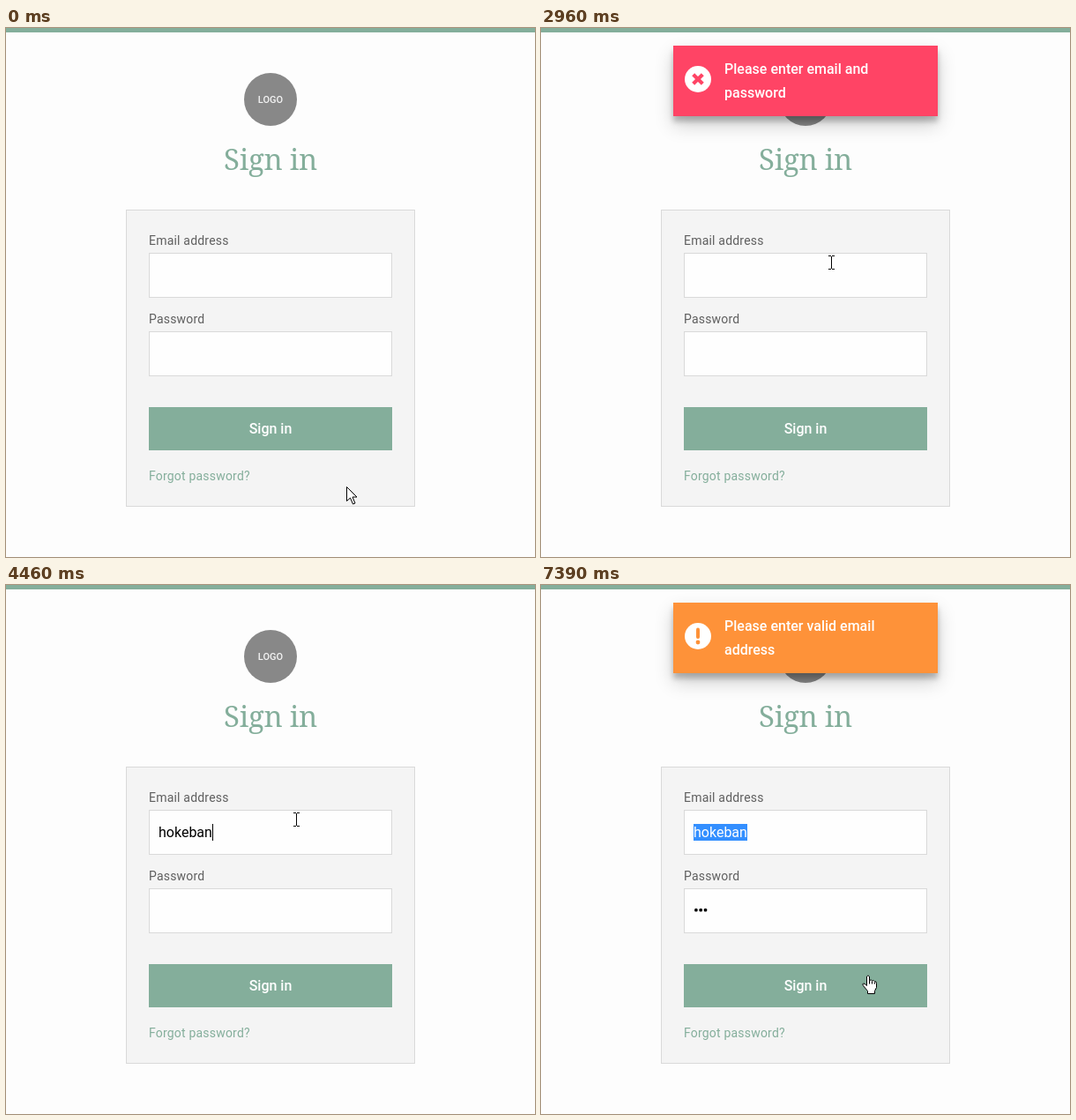
Write an HTML page with a canvas that moves like this. It is 600x600 px and loops after 8000 ms.

```html
<!DOCTYPE html>
<html lang="en">
<head>
<meta charset="utf-8">
<title>Sign in form</title>
<style>
html, body { margin: 0; width: 100%; height: 100%; overflow: hidden; background: #fdfdfd; }
canvas { display: block; }
</style>
</head>
<body>
<canvas id="stage" width="600" height="600"></canvas>
<script>
const ctx = document.getElementById('stage').getContext('2d');
const LOOP = 8000;
const GREEN = '#84ae9b';
const SANS = 'Roboto, "Liberation Sans", sans-serif';
const SERIF = '"Noto Serif", "DejaVu Serif", serif';
const USER = 'hokeban';

// Step tracks: [start time, value...]
const cursors = [
  [0, 'arrow', 386, 520], [530, 'arrow', 384, 517], [660, 'arrow', 372, 507],
  [790, 'arrow', 350, 489], [920, 'hand', 324, 463], [1050, 'hand', 318, 453],
  [2140, 'hand', 317, 449], [2290, 'beam', 317, 366], [2420, 'beam', 318, 286],
  [2560, 'beam', 325, 262], [2680, 'beam', 326, 258], [6410, 'arrow', 342, 337],
  [6560, 'beam', 359, 375], [6690, 'hand', 362, 432], [6840, 'hand', 363, 439],
  [6980, 'hand', 364, 442]
];
const typed = [[0, 0], [3370, 2], [3650, 3], [3790, 4], [4050, 5], [4180, 6], [4460, 7]];
const dots = [[0, 0], [5420, 1], [5570, 2], [5840, 3]];
const carets = [
  [0, ''], [1350, 'email'], [1880, ''], [2420, 'email'], [2960, ''], [3370, 'email'],
  [4870, 'pass'], [5290, ''], [5420, 'pass'], [6410, ''], [6980, 'pass'], [7260, '']
];
// kind, horizontal shift, opacity
const toasts = [
  [0, ''], [1350, 'error', 0, 1], [4310, 'error', -197, 1], [4460, ''],
  [7260, 'warning', 0, 0.5], [7390, 'warning', 0, 1]
];
const SELECT_AT = 7260;

const at = (track, t) => track.filter(step => step[0] <= t).pop().slice(1);

function rect(x, y, w, h, fill) {
  ctx.fillStyle = fill;
  ctx.fillRect(x, y, w, h);
}

function box(x, y, w, h, fill) {
  rect(x, y, w, h, '#d9d9d9');
  rect(x + 1, y + 1, w - 2, h - 2, fill);
}

function disc(x, y, r, fill) {
  ctx.fillStyle = fill;
  ctx.beginPath();
  ctx.arc(x, y, r, 0, Math.PI * 2);
  ctx.fill();
}

function text(str, x, y, font, fill, { align = 'left', spacing = 0 } = {}) {
  ctx.font = font;
  ctx.textAlign = align;
  ctx.letterSpacing = spacing + 'px';
  ctx.fillStyle = fill;
  ctx.fillText(str, x, y);
}

function line(x1, y1, x2, y2, width, color) {
  ctx.lineWidth = width;
  ctx.strokeStyle = color;
  ctx.beginPath();
  ctx.moveTo(x1, y1);
  ctx.lineTo(x2, y2);
  ctx.stroke();
}

function drawPage() {
  rect(0, 0, 600, 600, '#fdfdfd');
  rect(0, 0, 600, 5, GREEN);
  disc(300, 81, 30, '#888');
  text('LOGO', 300, 85, '500 11px ' + SANS, '#f4f4f4', { align: 'center' });
  text('Sign in', 300, 161, '33px ' + SERIF, GREEN, { align: 'center', spacing: -0.3 });

  box(136, 206, 328, 337, '#f4f4f4');
  const label = '14px ' + SANS;
  text('Email address', 162, 246, label, '#5f5f5f', { spacing: 0.2 });
  text('Password', 162, 335, label, '#5f5f5f', { spacing: 0.2 });
  box(162, 255, 276, 51, '#fefefe');
  box(162, 344, 276, 51, '#fefefe');
  rect(162, 430, 276, 49, GREEN);
  text('Sign in', 300, 460, '500 16px ' + SANS, '#fff', { align: 'center' });
  text('Forgot password?', 162, 513, label, GREEN, { spacing: 0.2 });
}

function drawFields(t) {
  const font = '16px ' + SANS;
  const value = USER.slice(0, at(typed, t)[0]);
  const count = at(dots, t)[0];
  const [focus] = at(carets, t);
  const selected = t >= SELECT_AT;

  ctx.font = font;
  ctx.letterSpacing = '0px';
  const width = Math.round(ctx.measureText(value).width);
  if (selected) rect(173, 271, width, 19, '#338fff');
  text(value, 173, 286, font, selected ? '#fff' : '#000');

  for (let i = 0; i < count; i++) disc(175.9 + i * 5.3, 368.7, 1.9, '#000');

  if (focus === 'email') rect(173 + width, 271, 1, 19, '#000');
  if (focus === 'pass') rect(173 + Math.round(count * 5.35), 360, 1, 19, '#000');
}

function drawToast(t) {
  const [kind, shift, alpha] = at(toasts, t);
  if (!kind) return;
  const error = kind === 'error';
  const color = error ? '#ff4465' : '#fe9239';

  ctx.save();
  ctx.translate(shift, 0);
  ctx.globalAlpha = alpha;
  for (const [dy, blur, a] of [[10, 20, 0.19], [6, 6, 0.23]]) {
    ctx.shadowColor = `rgba(0,0,0,${a})`;
    ctx.shadowOffsetY = dy;
    ctx.shadowBlur = blur;
    rect(150, 20, 300, 80, color);
  }
  ctx.shadowColor = 'transparent';
  rect(150, 20, 300, 80, color);

  disc(178, 58, 15, '#fff');
  if (error) {
    line(172.7, 52.7, 183.3, 63.3, 4.2, color);
    line(183.3, 52.7, 172.7, 63.3, 4.2, color);
  } else {
    ctx.lineCap = 'round';
    line(178, 50.5, 178, 59, 4, color);
    disc(178, 65, 2.4, color);
  }
  const lines = error
    ? ['Please enter email and', 'password']
    : ['Please enter valid email', 'address'];
  lines.forEach((s, i) => text(s, 208, 52 + i * 27, '500 16px ' + SANS, '#fff'));
  ctx.restore();
}

const arrowPath = new Path2D('M0 0V16L4 12.5L7 19.5L9.5 18.5L6.5 11.5H11.5Z');
const handPath = new Path2D(
  'M5 1.5Q6.5-.8 8 1.5V6Q10 4.6 11 6.5Q13 5.2 14 7.3Q16 6.8 16 9V14L14 18V21H6V18' +
  'L1 12Q-.3 10 1 9.5Q2.5 9 5 12Z');

function drawCursor(t) {
  const [shape, x, y] = at(cursors, t);
  ctx.save();
  ctx.translate(x, y);
  if (shape === 'beam') {
    rect(0, 0, 3, 1, '#000');
    rect(4, 0, 3, 1, '#000');
    rect(3, 1, 1, 14, '#000');
    rect(0, 15, 3, 1, '#000');
    rect(4, 15, 3, 1, '#000');
  } else {
    const path = shape === 'hand' ? handPath : arrowPath;
    ctx.translate(0.5, 0.5);
    ctx.fillStyle = '#fff';
    ctx.strokeStyle = '#000';
    ctx.lineWidth = 1;
    ctx.fill(path);
    ctx.stroke(path);
    if (shape === 'hand') {
      for (const [kx, ky] of [[8, 6], [11, 7], [14, 8]]) line(kx, ky, kx, 10, 1, '#000');
    }
  }
  ctx.restore();
}

function draw(t) {
  drawPage();
  drawFields(t);
  drawToast(t);
  drawCursor(t);
}

const start = performance.now();
function tick() {
  draw((performance.now() - start) % LOOP);
  requestAnimationFrame(tick);
}
tick();
</script>
</body>
</html>
```
